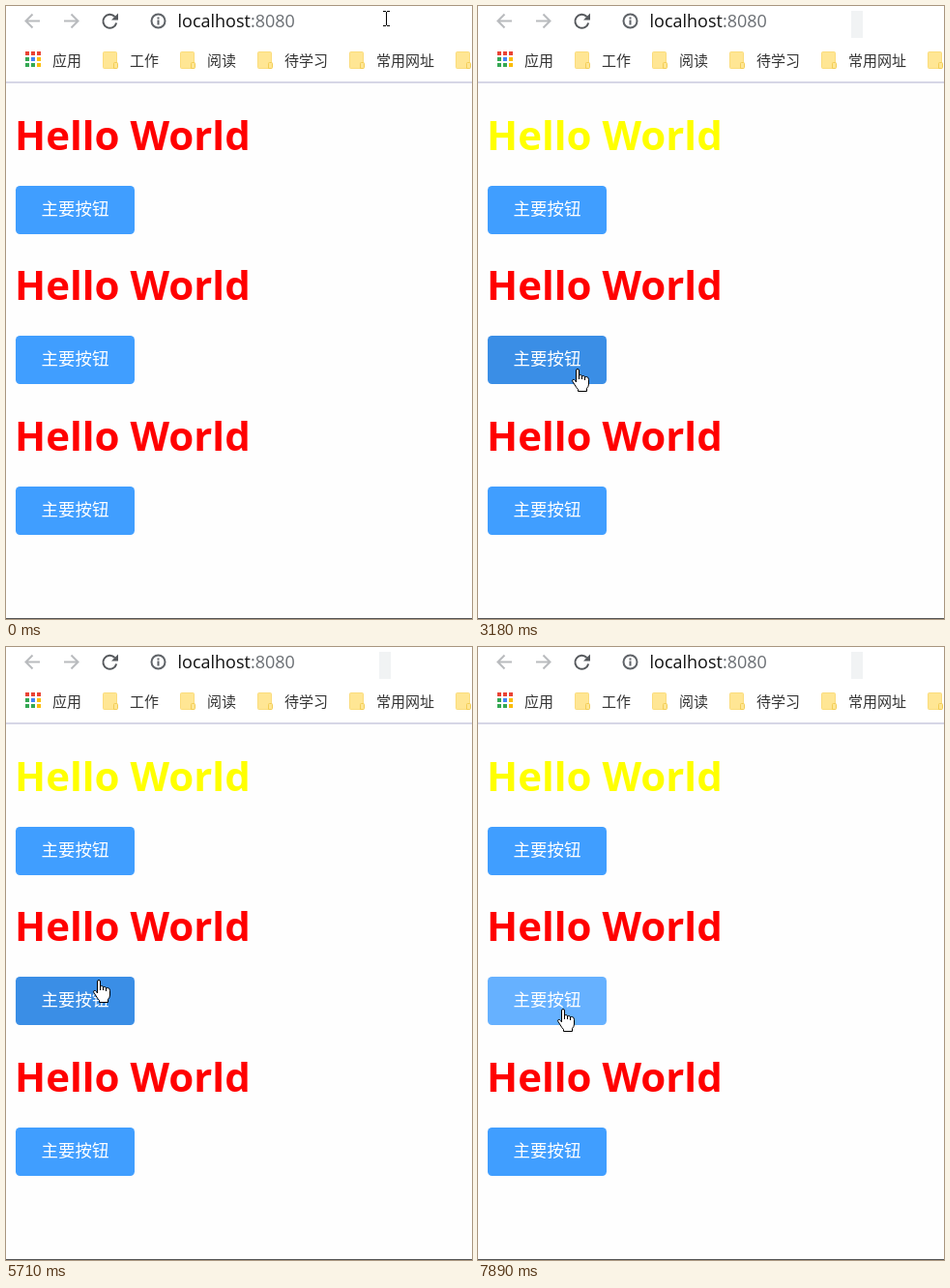
Write an HTML page that moves like this. It is 482 px wide and 634 px high and loops after 8000 ms.

```html
<!DOCTYPE html>
<html lang="zh-CN">
<head>
<meta charset="utf-8">
<title>Hello World</title>
<style>
  html, body { margin: 0; width: 100%; height: 100%; overflow: hidden; background: #fff; }
  svg { display: block; width: 482px; height: 634px; }
  .url { font: 18px "Open Sans", "Noto Sans", sans-serif; fill: #111; }
  .port { fill: #6b6f74; }
  .mark { font: 15px "Noto Sans CJK SC", "Noto Sans CJK", sans-serif; fill: #333; }
  .title { font: bold 42px "Open Sans", "Noto Sans", sans-serif; }
  .label { font: 17.5px "Noto Sans CJK SC", "Noto Sans CJK", sans-serif; fill: #fff; }
  .line { fill: none; stroke-width: 2; }
  .pointer { fill: #fff; stroke: #000; stroke-linejoin: round; }
  #beam { mix-blend-mode: difference; fill: #fff; }
</style>
</head>
<body>
<svg viewBox="0 0 482 634">
  <defs>
    <g id="folder">
      <path d="M1.5 .5H13.5Q14.5 .5 14.5 1.5V17.5H1.5Q.5 17.5 .5 16.5V1.5Q.5 .5 1.5 .5Z" fill="#ffe694" stroke="#fbdc7c"/>
      <path d="M11.5 17.5V12.5Q11.5 11.5 12.5 11.5H14.5Q15.5 11.5 15.5 12.5V16.5Q15.5 17.5 14.5 17.5Z" fill="#ffe694" stroke="#f3cd55"/>
    </g>
  </defs>
  <rect width="482" height="634" fill="#fff"/>
  <rect y="80" width="482" height="553" fill="#fefefe"/>
  <rect y="78" width="482" height="2" fill="#d6d6e6"/>
  <rect y="633" width="482" height="1" fill="#555"/>

  <path class="line" stroke="#b9bbbe" d="M35 15.5H21M27.5 8.5L20.5 15.5L27.5 22.5M60 15.5H74M67.500 8.5L74.500 15.5L67.500 22.5"/>
  <path class="line" stroke="#55585c" d="M112.500 11A7 7 0 1 0 114.200 17.500"/>
  <path fill="#55585c" d="M116 7.500V14.500H109Z"/>
  <circle class="line" cx="157.500" cy="15.500" r="7" stroke="#5f6368"/>
  <path fill="#5f6368" d="M156.500 11.500h2v2h-2zM156.500 14.500h2v5h-2z"/>
  <text class="url" x="177.500" y="22">localhost<tspan class="port">:8080</tspan></text>
  <rect id="patch" x="386" y="5" width="12" height="28" fill="#f1f3f4"/>
  <g id="marks"></g>
  <g id="page"></g>

  <g id="beam">
    <path d="M-3 -8h3v1h-3zM1 -8h3v1h-3zM0 -7h1v14h-1zM-3 7h3v1h-3zM1 7h3v1h-3z"/>
  </g>
  <path id="arrow" class="pointer" d="M.5 .8V16.500L4.200 13L6.700 18.800L9 17.800L6.500 12.200H11.500Z"/>
  <g id="hand">
    <path class="pointer" d="M-1.5 14V2Q-1.5 .5 0 .5Q1.5 .5 1.5 2V7.500Q2 6.500 3.300 6.500Q4.500 6.700 4.500 8.300Q5 7.500 6.300 7.500Q7.500 7.700 7.500 9.300Q8 8.500 9.300 8.500Q11.500 8.900 11.500 11.300V16Q11.500 18.500 9.500 20.500V23.500H.5V21.500Q-1.500 19.500 -2.800 17L-5.200 13.200Q-6 12 -4.800 11.400Q-3.500 10.900 -2.500 12.500Z"/>
    <path fill="none" stroke="#000" d="M1.5 7V11M4.5 8V11M7.5 9V12"/>
  </g>
</svg>
<script>
const $ = id => document.getElementById(id);
const NS = 'http://www.w3.org/2000/svg';

function add(parent, tag, attrs, text = '') {
  const el = document.createElementNS(NS, tag);
  for (const key in attrs) el.setAttribute(key, attrs[key]);
  el.textContent = text;
  return parent.appendChild(el);
}

// Bookmarks bar
const gridColors = ['#ea4335', '#ea4335', '#ea4335', '#34a853', '#4285f4', '#fbbc05', '#34a853', '#34a853', '#fbbc05'];
gridColors.forEach((fill, i) => add($('marks'), 'rect', {
  x: 20 + i % 3 * 6, y: 47 + Math.floor(i / 3) * 6, width: 4, height: 4, fill
}));
[[48, '应用'], [128, '工作'], [208, '阅读'], [288, '待学习'], [383, '常用网址']]
  .forEach(([x, text]) => add($('marks'), 'text', { class: 'mark', x, y: 62 }, text));
[100, 180, 260, 355, 465]
  .forEach(x => add($('marks'), 'use', { href: '#folder', x, y: 47 }));

// Three blocks, each a heading and a button
const blocks = [186, 341, 497].map(y => {
  const title = add($('page'), 'text', { class: 'title', x: 9, y: y - 37 }, 'Hello World');
  const button = add($('page'), 'rect', { x: 10, y, width: 123, height: 50, rx: 4.5 });
  add($('page'), 'text', { class: 'label', x: 36.5, y: y + 30 }, '主要按钮');
  return { title, button };
});

const buttonColors = { n: '#409eff', h: '#66b1ff', a: '#3a8ee6' };
const titleColors = { r: '#f00', y: '#ff0' };

// time, pointer, x, y, button states (normal, hover/focus, active), title colours
const steps = [
  [0, 'beam', 393, 13, 'nnn', 'rrr'],
  [500, 'arrow', 386, 219, 'nnn', 'rrr'],
  [1140, 'arrow', 300, 132, 'nnn', 'rrr'],
  [1280, 'arrow', 199, 218, 'nnn', 'rrr'],
  [1550, 'arrow', 153, 204, 'nnn', 'rrr'],
  [1700, 'hand', 122, 209, 'hnn', 'rrr'],
  [1820, 'hand', 104, 214, 'hnn', 'rrr'],
  [2120, 'hand', 104, 214, 'ann', 'rrr'],
  [2260, 'hand', 104, 214, 'hnn', 'yrr'],
  [2550, 'arrow', 104, 242, 'hnn', 'yrr'],
  [2670, 'beam', 103, 290, 'hnn', 'yrr'],
  [2790, 'arrow', 103, 326, 'hnn', 'yrr'],
  [2910, 'hand', 103, 375, 'hhn', 'yrr'],
  [3180, 'hand', 103, 375, 'nan', 'yrr'],
  [3330, 'hand', 103, 375, 'nhn', 'yrr'],
  [3730, 'arrow', 102, 404, 'nhn', 'yrr'],
  [3880, 'beam', 101, 448, 'nhn', 'yrr'],
  [4030, 'arrow', 99, 492, 'nhn', 'yrr'],
  [4150, 'hand', 100, 506, 'nhh', 'yrr'],
  [4290, 'hand', 100, 516, 'nhh', 'yrr'],
  [4570, 'hand', 100, 516, 'nna', 'yrr'],
  [4840, 'hand', 100, 516, 'nnh', 'yrr'],
  [5130, 'beam', 101, 435, 'nnh', 'yrr'],
  [5280, 'arrow', 99, 396, 'nnh', 'yrr'],
  [5430, 'hand', 96, 344, 'nhh', 'yrr'],
  [5710, 'hand', 96, 344, 'nan', 'yrr'],
  [5840, 'hand', 96, 344, 'nhn', 'yyr'],
  [6410, 'hand', 96, 344, 'nan', 'yyr'],
  [6550, 'hand', 96, 344, 'nhn', 'yrr'],
  [6700, 'hand', 94, 348, 'nhn', 'yrr'],
  [6850, 'hand', 91, 353, 'nhn', 'yrr'],
  [7050, 'hand', 88, 357, 'nhn', 'yrr'],
  [7460, 'arrow', 88, 402, 'nhn', 'yrr'],
  [7600, 'beam', 88, 461, 'nhn', 'yrr'],
  [7750, 'arrow', 88, 410, 'nhn', 'yrr'],
  [7890, 'hand', 88, 374, 'nhn', 'yrr']
];

const start = performance.now();
let shown = null;

function draw() {
  const time = (performance.now() - start) % 8000;
  const step = steps.findLast(s => s[0] <= time);
  if (step !== shown) {
    shown = step;
    const [at, pointer, x, y, buttons, titles] = step;
    for (const id of ['beam', 'arrow', 'hand']) {
      $(id).setAttribute('display', id === pointer ? 'inline' : 'none');
    }
    $(pointer).setAttribute('transform', `translate(${x} ${y})`);
    $('patch').setAttribute('display', at < 500 ? 'none' : 'inline');
    blocks.forEach(({ title, button }, i) => {
      title.setAttribute('fill', titleColors[titles[i]]);
      button.setAttribute('fill', buttonColors[buttons[i]]);
    });
  }
  requestAnimationFrame(draw);
}
draw();
</script>
</body>
</html>
```
